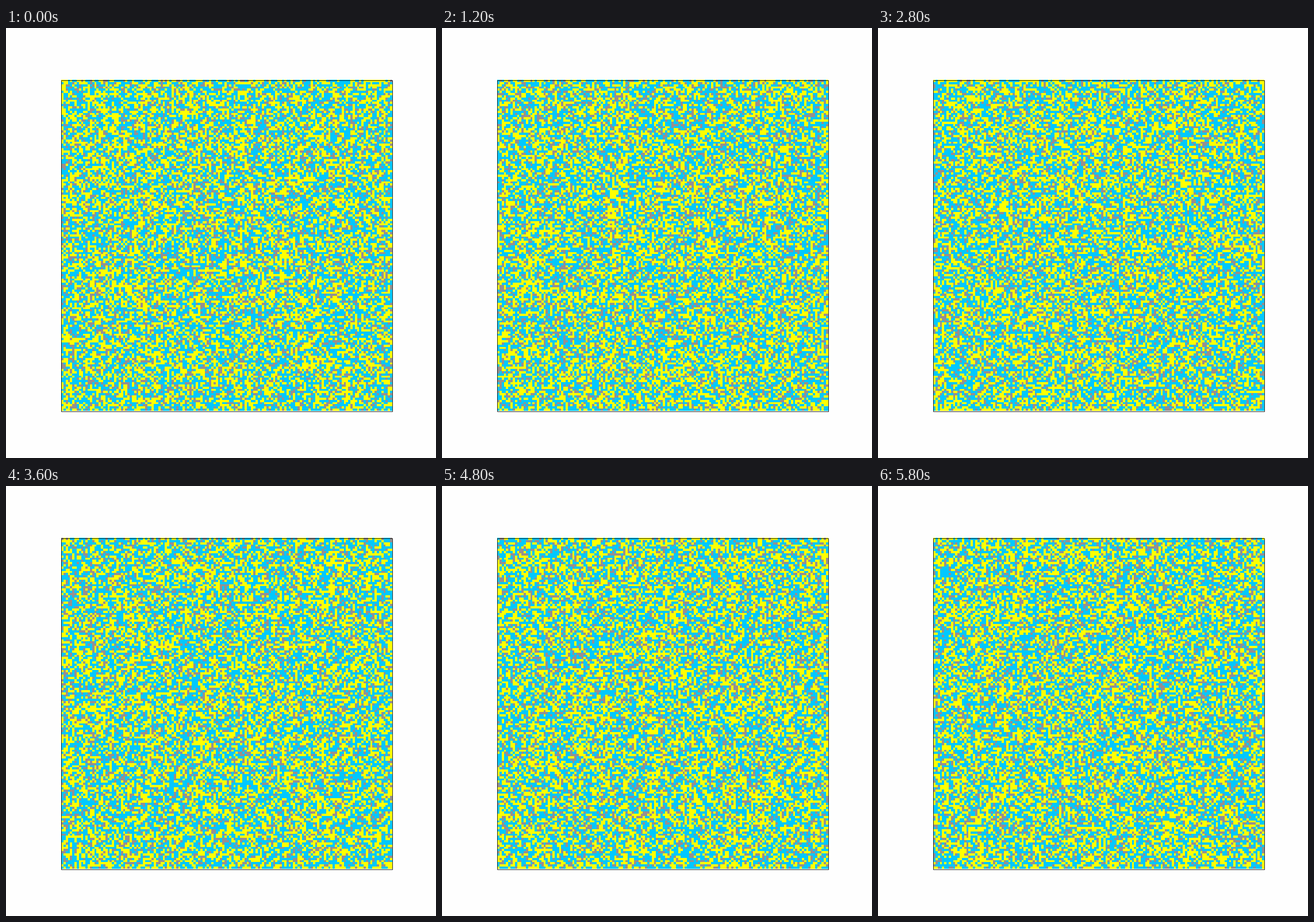
Recreate the animation shown at these times as a matplotlib script. Size 748 px wide and 748 px high, loop 6 s.

```python
import numpy as np
import matplotlib.pyplot as plt
from matplotlib.animation import FuncAnimation
from matplotlib.colors import ListedColormap
from matplotlib.patches import Rectangle

SIZE, DPI = 748, 100
LEFT, TOP, SIDE = 96, 90, 576
CELLS = 150
FRAMES, INTERVAL = 30, 200
COLORS = ["#00c8ff", "#ffff00", "#969090"]
SHARES = [0.44, 0.40, 0.16]


def lattice(step):
    """Random three-state grid, fixed for each step."""
    rng = np.random.default_rng(1000 + step)
    return rng.choice(len(SHARES), size=(CELLS, CELLS), p=SHARES)


fig = plt.figure(figsize=(SIZE / DPI, SIZE / DPI), dpi=DPI, facecolor="#fefefe")
ax = fig.add_axes([0, 0, 1, 1])
ax.axis("off")

grid = ax.imshow(
    lattice(0),
    cmap=ListedColormap(COLORS),
    vmin=-0.5,
    vmax=len(COLORS) - 0.5,
    interpolation="nearest",
    extent=(LEFT, LEFT + SIDE, TOP + SIDE, TOP),
    aspect="auto",
)
# The thin border lets the cells under its left and top edges show through.
ax.add_patch(Rectangle((LEFT + 0.5, TOP + 0.5), SIDE, SIDE, fill=False,
                       edgecolor="black", alpha=0.8, linewidth=72 / DPI, zorder=3))
ax.set_xlim(0, SIZE)
ax.set_ylim(SIZE, 0)


def update(frame):
    # The opening state is held for two ticks.
    grid.set_data(lattice(max(frame - 1, 0)))
    return [grid]


anim = FuncAnimation(fig, update, frames=FRAMES, interval=INTERVAL,
                     repeat=True, repeat_delay=0, blit=False)
plt.show()
```
